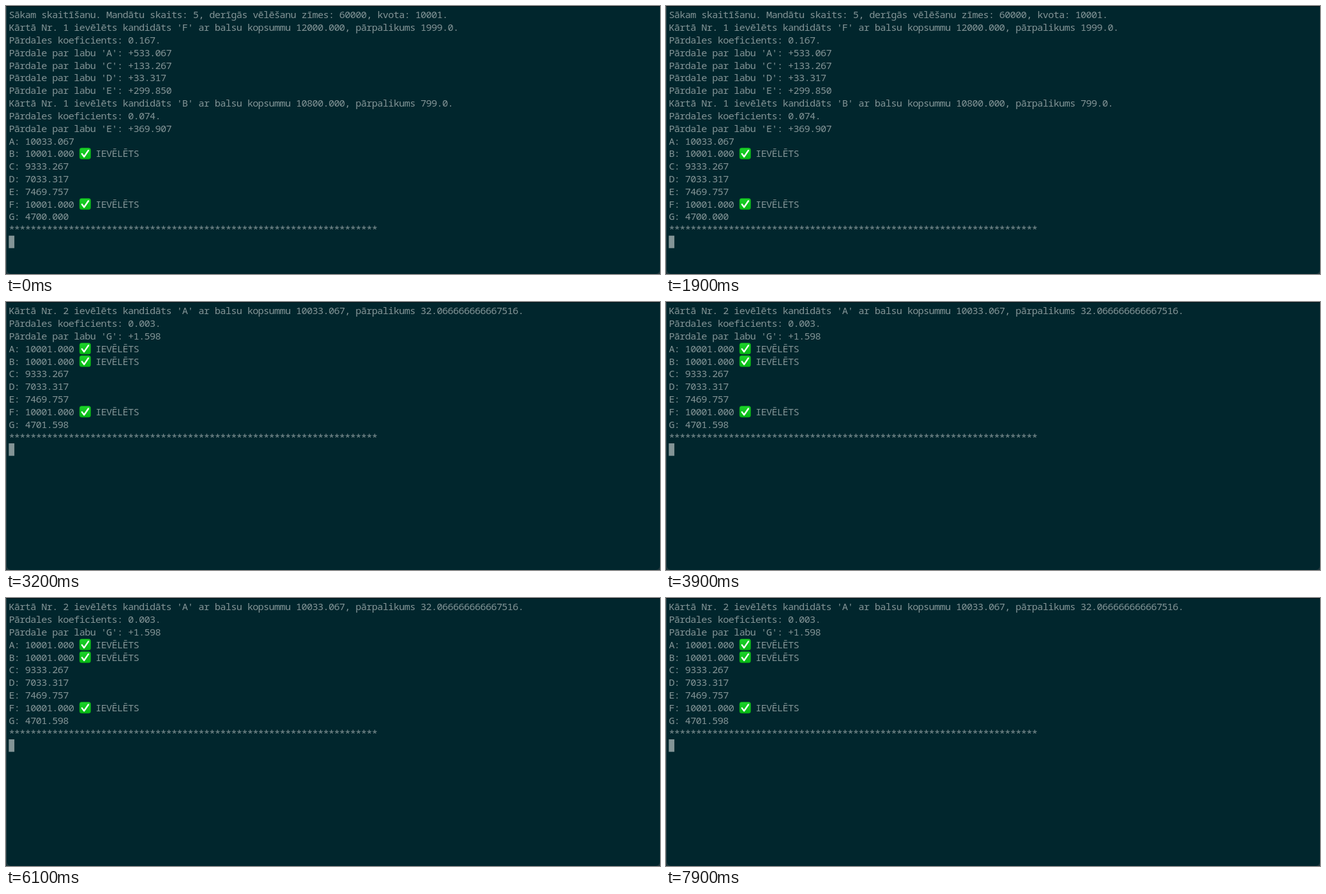
Recreate the animation shown at these times as an HTML page. Size 1024 px wide and 421 px high, loop 8000 ms.

```html
<!DOCTYPE html>
<html lang="lv">
<head>
<meta charset="utf-8">
<title>Balsu skaitīšana</title>
<style>
  html, body { margin: 0; width: 100%; height: 100%; overflow: hidden; background: #20383e; }
  #term {
    position: absolute; inset: 0; overflow: hidden; box-sizing: border-box;
    background: #01262d; border: solid; border-width: 1px 0 0 1px;
    border-color: #04151a transparent transparent #33494e;
    border-radius: 0 0 7px 7px;
  }
  svg { position: absolute; left: -1px; top: -1px; }
  text {
    font: 15.3px "Noto Sans Mono", "DejaVu Sans Mono", monospace;
    letter-spacing: calc(8.485px - 0.6em);
    fill: #839496; white-space: pre;
  }
</style>
</head>
<body>
<div id="term">
  <svg id="view" width="1024" height="421" viewBox="0 0 1024 421">
    <defs>
      <linearGradient id="green" x1="0" y1="0" x2="0" y2="1">
        <stop offset="0" stop-color="#1cd22a"/>
        <stop offset="1" stop-color="#06b814"/>
      </linearGradient>
      <g id="tick">
        <rect x=".5" y=".5" width="17.4" height="17.4" rx="3.2" fill="url(#green)" stroke="#0aa018" stroke-width=".7"/>
        <path d="M4.2 9.8 7.6 14.2 14.3 4.4" fill="none" stroke="#fff" stroke-width="2.4"
              stroke-linecap="round" stroke-linejoin="round"/>
      </g>
    </defs>
  </svg>
</div>
<script>
const LOOP = 8000, SWITCH = 3200;
const LEFT = 4.4, COL = 8.485, ROW = 19.82, BASE = 19.3;
const STARS = '*'.repeat(68);
const won = name => `${name}: 10001.000 ✓  IEVĒLĒTS`;

const screens = [
  [
    'Sākam skaitīšanu. Mandātu skaits: 5, derīgās vēlēšanu zīmes: 60000, kvota: 10001.',
    "Kārtā Nr. 1 ievēlēts kandidāts 'F' ar balsu kopsummu 12000.000, pārpalikums 1999.0.",
    'Pārdales koeficients: 0.167.',
    "Pārdale par labu 'A': +533.067",
    "Pārdale par labu 'C': +133.267",
    "Pārdale par labu 'D': +33.317",
    "Pārdale par labu 'E': +299.850",
    "Kārtā Nr. 1 ievēlēts kandidāts 'B' ar balsu kopsummu 10800.000, pārpalikums 799.0.",
    'Pārdales koeficients: 0.074.',
    "Pārdale par labu 'E': +369.907",
    'A: 10033.067', won('B'), 'C: 9333.267', 'D: 7033.317', 'E: 7469.757', won('F'), 'G: 4700.000',
    STARS
  ],
  [
    "Kārtā Nr. 2 ievēlēts kandidāts 'A' ar balsu kopsummu 10033.067, pārpalikums 32.066666666667516.",
    'Pārdales koeficients: 0.003.',
    "Pārdale par labu 'G': +1.598",
    won('A'), won('B'), 'C: 9333.267', 'D: 7033.317', 'E: 7469.757', won('F'), 'G: 4701.598',
    STARS
  ]
];

function add(parent, tag, attrs, content = '') {
  const el = document.createElementNS('http://www.w3.org/2000/svg', tag);
  for (const key in attrs) el.setAttribute(key, attrs[key]);
  el.textContent = content;
  return parent.appendChild(el);
}

function buildScreen(lines) {
  const group = add(document.getElementById('view'), 'g', {});
  lines.forEach((line, row) => {
    const y = BASE + row * ROW;
    const [head, tail] = line.split('✓');
    add(group, 'text', { x: LEFT, y }, head);
    if (tail) {
      const x = LEFT + head.length * COL;
      add(group, 'use', { href: '#tick', x, y: y - 14.8 });
      add(group, 'text', { x: x + 3 * COL, y }, tail.trim());
    }
  });
  add(group, 'rect', { x: LEFT, y: 4 + lines.length * ROW, width: 8.7, height: 19.6, fill: '#839496' });
  return group;
}

const groups = screens.map(buildScreen);

function draw() {
  const active = performance.now() % LOOP < SWITCH ? 0 : 1;
  groups.forEach((group, i) => group.setAttribute('visibility', i === active ? 'visible' : 'hidden'));
  requestAnimationFrame(draw);
}
draw();
</script>
</body>
</html>
```
